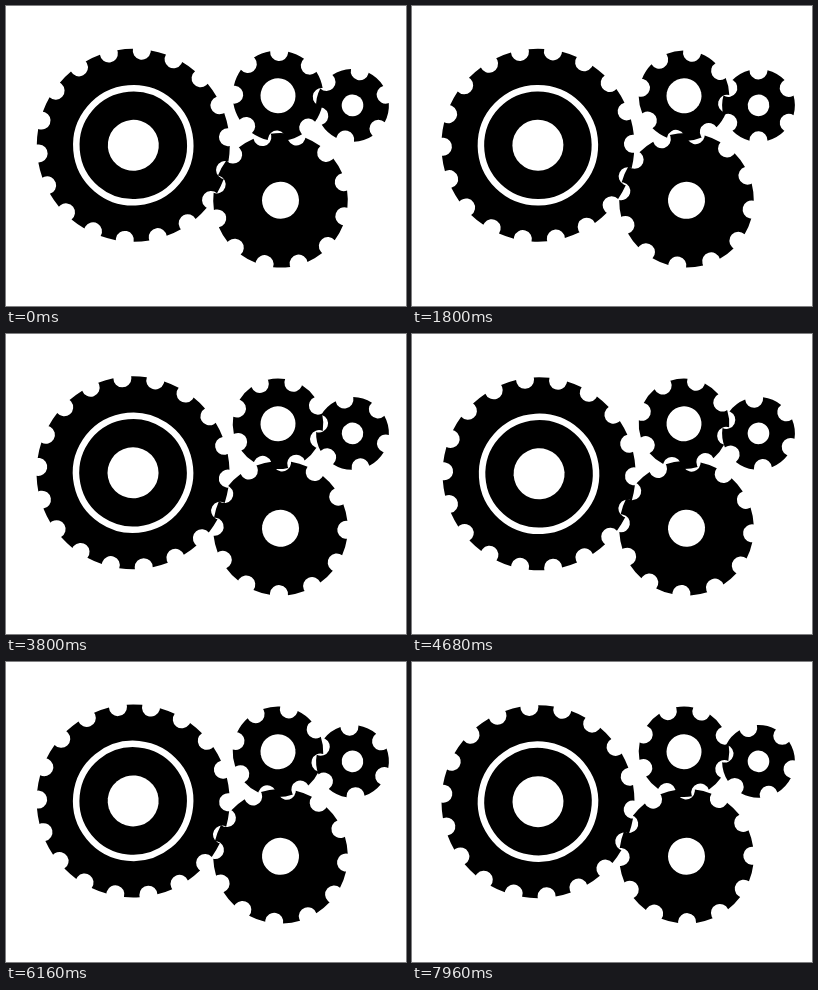
Recreate the animation shown at these times as an HTML page with a canvas. Size 400 by 300 pixels, loop 8000 ms.

```html
<!DOCTYPE html>
<html lang="en">
<head>
<meta charset="utf-8">
<title>Gears</title>
<style>
  html, body { margin: 0; width: 100%; height: 100%; overflow: hidden; background: #fff; }
  canvas { display: block; }
</style>
</head>
<body>
<canvas id="stage" width="400" height="300"></canvas>
<script>
const ctx = document.getElementById('stage').getContext('2d');
const STEP = 40, LOOP = 8000;
const TOOTH_STEP = 214.4; // degrees of one tooth pitch-unit passed per step, shared by all meshed gears
const NOTCH = 9;
const rad = degrees => degrees * Math.PI / 180;

// start: clockwise angle of one tooth from the top; dir: sense of rotation
const gears = [
  { x: 126.6, y: 139.3, r: 96.5, teeth: 18, hole: 25.5, start: -4.9, dir: -1, ring: 57, wobble: 0.7 },
  { x: 274.5, y: 194.3, r: 67.3, teeth: 12, hole: 18.5, start: -1, dir: 1 },
  { x: 272, y: 89.8, r: 45.3, teeth: 8, hole: 17.5, start: 24, dir: -1 },
  { x: 346.5, y: 99.4, r: 36.4, teeth: 6, hole: 10.8, start: 42, dir: 1 }
];

// Outline of arcs: tooth tips on the rim, round bites between them
function gearPath({ r, teeth }) {
  const path = new Path2D();
  const pitch = 2 * Math.PI / teeth;
  const centre = r - 1.5;
  const cosHalf = (r * r + centre * centre - NOTCH * NOTCH) / (2 * r * centre);
  const half = Math.acos(cosHalf);
  const bite = Math.atan2(r * Math.sin(half), r * cosHalf - centre);
  for (let i = 0; i < teeth; i++) {
    const tip = i * pitch - Math.PI / 2;
    const gap = tip + pitch / 2;
    path.arc(0, 0, r, tip - pitch / 2 + half, gap - half);
    path.arc(centre * Math.cos(gap), centre * Math.sin(gap), NOTCH, gap - bite, gap + bite, true);
  }
  path.closePath();
  return path;
}

function circle(radius) {
  ctx.beginPath();
  ctx.arc(0, 0, radius, 0, 2 * Math.PI);
}

function drawGear(gear, step) {
  const turn = gear.dir * step * TOOTH_STEP / gear.teeth;
  const wobble = gear.wobble || 0;
  ctx.save();
  ctx.translate(gear.x + wobble * Math.cos(rad(turn)), gear.y + wobble * Math.sin(rad(turn)));
  ctx.rotate(rad(gear.start + turn));
  ctx.fillStyle = '#000';
  ctx.fill(gear.path);
  ctx.fillStyle = ctx.strokeStyle = '#fff';
  circle(gear.hole);
  ctx.fill();
  if (gear.ring) {
    ctx.lineWidth = 6.5;
    circle(gear.ring);
    ctx.stroke();
  }
  ctx.restore();
}

for (const gear of gears) gear.path = gearPath(gear);

function draw() {
  const step = Math.floor(performance.now() % LOOP / STEP);
  ctx.fillStyle = '#fff';
  ctx.fillRect(0, 0, 400, 300);
  for (const gear of gears) drawGear(gear, step);
  requestAnimationFrame(draw);
}
draw();
</script>
</body>
</html>
```
